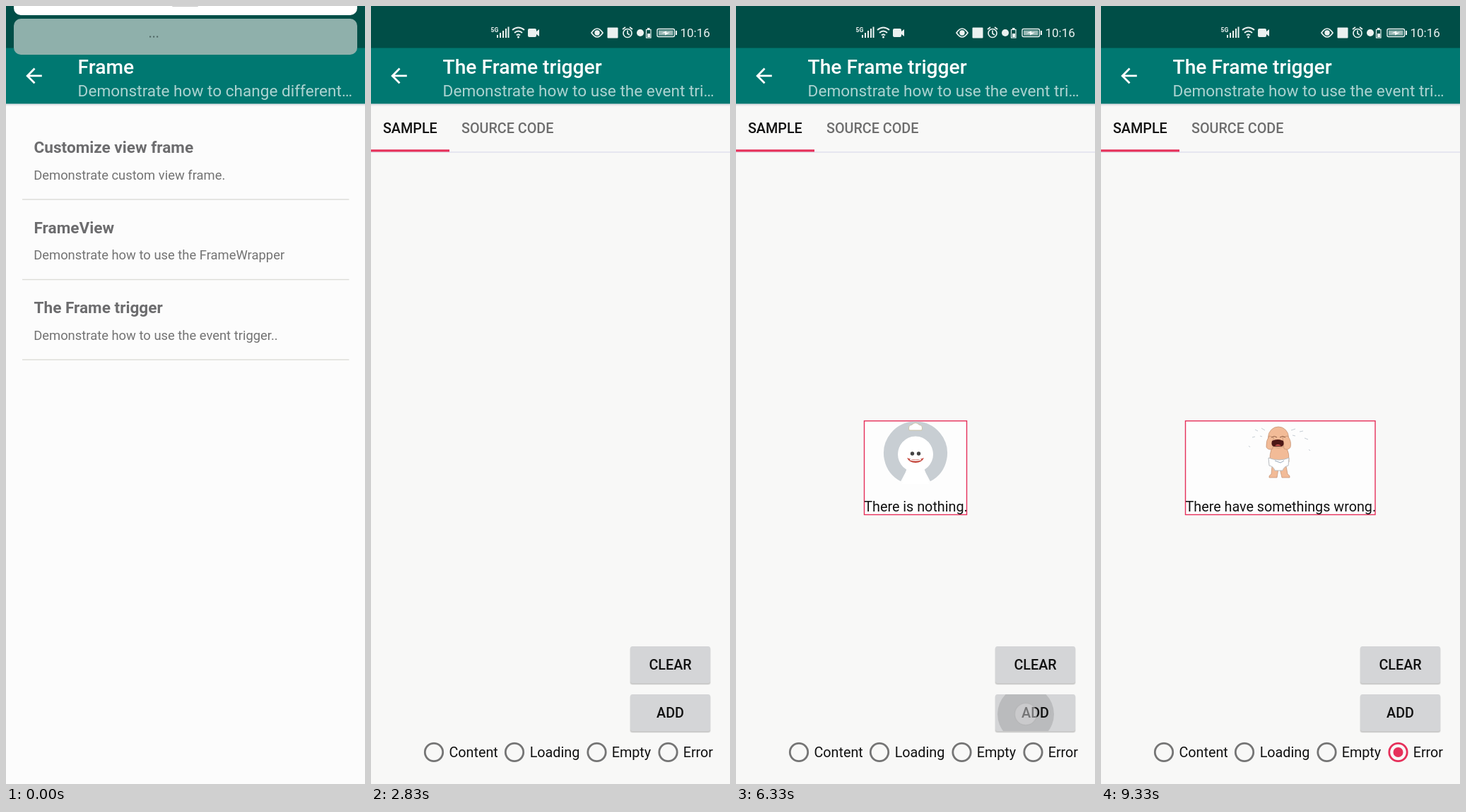
These frames come from a looping animation (508 by 1102 pixels, 9490 ms). An HTML page:

```html
<!DOCTYPE html>
<html lang="en">
<head>
<meta charset="utf-8">
<title>Frame trigger demo</title>
<style>
  html, body { margin: 0; width: 100%; height: 100%; overflow: hidden; background: #fbfbfb; }
  svg { display: block; width: 508px; height: 1102px; font-family: Roboto, Arial, sans-serif; }
  .title { font-size: 28.2px; font-weight: 500; fill: #fff; }
  .subtitle { font-size: 22.6px; fill: #fff; fill-opacity: .68; }
  .row-title { font-size: 22.6px; font-weight: 700; fill: #6c6c6e; }
  .row-note { font-size: 18.4px; fill: #737373; }
  .item { font-size: 22.6px; fill: #212121; }
  .small { font-size: 19.76px; fill: #111; }
  .strong { font-weight: 500; }
  .mid { text-anchor: middle; }
  .line { fill: none; stroke: #fff; }
</style>
</head>
<body>
<svg viewBox="0 0 508 1102">
  <defs>
    <linearGradient id="shadow" x2="0" y2="1">
      <stop stop-color="#446" stop-opacity=".18"/>
      <stop offset="1" stop-color="#446" stop-opacity="0"/>
    </linearGradient>
    <clipPath id="rowClip"><rect x="23" y="388" width="462.500" height="112.500"/></clipPath>
    <clipPath id="listClip"><rect y="208" width="508" height="871"/></clipPath>
    <clipPath id="clearClip"><rect x="367" y="907" width="113" height="52" rx="3"/></clipPath>
    <clipPath id="addClip"><rect x="367" y="975" width="113" height="52" rx="3"/></clipPath>
  </defs>

  <g id="menu">
    <rect y="59" width="508" height="1043" fill="#fcfcfc"/>
    <g id="menuHead"></g>
    <g id="rows"></g>
    <g clip-path="url(#rowClip)"><circle id="rowRipple" fill-opacity=".22"/></g>
  </g>

  <g id="detail">
    <rect y="59" width="508" height="1043" fill="#f8f8f7"/>
    <g id="detailHead"></g>
    <text class="small strong" x="16.900" y="180">SAMPLE</text>
    <text class="small strong" x="128" y="180" fill-opacity=".6">SOURCE CODE</text>
    <rect y="206.300" width="508" height="1.400" fill="#dfdfee"/>
    <rect y="203.300" width="111" height="3.200" fill="#e6305a"/>
    <g id="list" clip-path="url(#listClip)"></g>
    <text id="newItem" class="item" x="45.200" y="272">New Item</text>

    <g id="empty">
      <rect x="181.500" y="587.700" width="145" height="132.800" fill="#fdfdfd" stroke="#e6305a" stroke-width="1.400"/>
      <path d="M238 664A34.500 34.500 0 1 1 270 664" fill="none" stroke="#c8ced3" stroke-width="21"/>
      <path d="M245 601q-2-7 4-8q5-5 10 0q6 1 4 8z" fill="#fff" stroke="#c9c3a8"/>
      <circle cx="254" cy="635" r="25" fill="#fff"/>
      <path d="M242 654h24l7 23h-38z" fill="#fff"/>
      <circle cx="249.500" cy="634" r="2.700" fill="#444"/>
      <circle cx="258.500" cy="634" r="2.700" fill="#444"/>
      <path d="M242 640q12 5 24 0q-3 7-12 7t-12-7z" fill="#c5493f"/>
      <path d="M246 642.500q8 2.500 16 0" fill="none" stroke="#fff" stroke-width="1.500"/>
      <text class="small" x="181.300" y="716">There is nothing.</text>
    </g>

    <g id="error">
      <rect x="119.500" y="587.700" width="268.500" height="132.800" fill="#fdfdfd" stroke="#e6305a" stroke-width="1.400"/>
      <path d="M218 600l4 2M227 598l5 3M214 611l4-1M209 623l2 2M225 609l3 1M269 601l6-2M281 603l5-1M271 608l4 1M288 612l5 2M294 628l2 2" stroke="#c6cdd4"/>
      <g fill="#f2bb97" stroke="#c08f70" stroke-width=".7">
        <path d="M242 652l-1 11q-4 2-3 5h11l2-13zM262 652l2 11q4 2 3 5h-11l-3-13z"/>
        <path d="M242 624q-4 12-3 22h27q1-12-4-22z"/>
        <ellipse cx="251" cy="611" rx="14.500" ry="15"/>
        <path d="M238 609q-5 7-4 16q3 5 9 2l1-16zM264 609q6 7 4 16q-3 5-9 2l-2-16z"/>
      </g>
      <path d="M241 611q5-3 8 0M253 611q4-3 8 0" fill="none" stroke="#8e5c43"/>
      <path d="M242 616q8-4 16 0q2 7-3 8h-10q-5-1-3-8z" fill="#4c1715"/>
      <path d="M246 623q4-4 9 0z" fill="#d45b55"/>
      <path d="M237 640q15 6 29 0l-1 11q-6 1-8 7h-11q-2-6-8-7z" fill="#fff" stroke="#b8bcc0"/>
      <path d="M246 644l8 3 5-3" fill="none" stroke="#9ab"/>
      <text class="small" x="119.500" y="716">There have somethings wrong.</text>
    </g>

    <g id="buttons"></g>
    <g id="radios"></g>
  </g>

  <rect width="508" height="59.500" fill="#004e47"/>
  <g id="status" fill="#fff" fill-opacity=".92" stroke-opacity=".92">
    <text x="169.500" y="37" font-size="8.500" font-weight="700">5G</text>
    <path d="M178 41h2v4h-2zM182 38h2v7h-2zM186 35h2v10h-2zM190 32h2v13h-2zM193.500 29.500h2v15.500h-2z"/>
    <path class="line" stroke-width="2" d="M200 34q8.500-7 17 0M203 38q5.500-5 11 0M206 41.500q2.500-2.500 5 0"/>
    <circle cx="208.500" cy="44" r="1.500"/>
    <path d="M224 32h8q2 0 2 2v2l4-3v10l-4-3v2q0 2-2 2h-8q-2 0-2-2v-8q0-2 2-2z"/>
    <path class="line" stroke-width="1.700" d="M312 38q8-12 16 0q-8 12-16 0z"/>
    <circle cx="320" cy="38" r="3.700"/>
    <rect x="334.500" y="30.500" width="15" height="15" rx="1"/>
    <g class="line" stroke-width="1.700">
      <circle cx="363" cy="38.500" r="6"/>
      <path d="M363 34.500v4.500l3 2M356 33l4-3M370 33l-4-3"/>
      <rect x="389.500" y="33.500" width="6.500" height="11.500" stroke-width="1.200"/>
      <rect x="405" y="32.500" width="24.500" height="11" rx="2" stroke-width="1.400"/>
    </g>
    <circle cx="381" cy="38" r="5"/>
    <path d="M391 39h4v5h-4zM391 31h3.500v2h-3.500zM431 35h2v6h-2z"/>
    <rect x="407" y="34.500" width="20.500" height="7" fill-opacity=".6"/>
    <path d="M411 38.500l7-3v2h5l-7 4v-3z"/>
    <text x="437.500" y="44" font-size="17">10:16</text>
  </g>

  <g id="shade">
    <rect x="11" y="-20" width="486" height="33" rx="10" fill="#fff"/>
    <rect x="235" y="-2" width="37" height="2.800" rx="1" fill="#bbb"/>
    <rect x="11" y="18" width="486" height="51" rx="10" fill="#8fb0ab"/>
    <path d="M203 43.500h2.200M208 43.500h2.200M213 43.500h2.200" stroke="#4f6663" stroke-width="2"/>
  </g>
  <circle id="touch" r="15.500" fill="#d9d9dc" fill-opacity=".5" stroke="#aaa" stroke-opacity=".35" stroke-width="1.500"/>
</svg>

<script>
const LOOP = 9490, FADE = 415;
const $ = id => document.getElementById(id);
const set = (id, attrs) => { for (const k in attrs) $(id).setAttribute(k, attrs[k]); };
const clamp = v => Math.max(0, Math.min(1, v));

const header = (title, note) => `
  <rect y="59" width="508" height="79.500" fill="#007871"/>
  <rect y="138.500" width="508" height="4" fill="url(#shadow)"/>
  <path class="line" stroke-width="2.800" d="M50.800 98.900H31M40.500 88.600L30.200 98.900L40.500 109.200"/>
  <text class="title" x="101.600" y="95.500">${title}</text>
  <text class="subtitle" x="101.600" y="127.500">${note}</text>`;

$('menuHead').innerHTML = header('Frame', 'Demonstrate how to change different…');
$('detailHead').innerHTML = header('The Frame trigger', 'Demonstrate how to use the event tri…');

$('rows').innerHTML = [
  ['Customize view frame', 'Demonstrate custom view frame.'],
  ['FrameView', 'Demonstrate how to use the FrameWrapper'],
  ['The Frame trigger', 'Demonstrate how to use the event trigger..']
].map(([name, note], i) => `<g transform="translate(0 ${i * 113.5})">
  <text class="row-title" x="39.500" y="208">${name}</text>
  <text class="row-note" x="39.200" y="245.500">${note}</text>
  <rect x="23" y="273.300" width="462.500" height="1.400" fill="#dcdcd8"/></g>`).join('');

$('list').innerHTML = [
  'Auberge de Marvol', 'Auberge du Val des Orins', 'Alvoren', 'Ambrelune', 'Amouvi',
  'Anven', 'Arvolsk', 'Aurivelle au Morvent', "Amarga'l Tozu", 'Aruik', 'Ashendel',
  'Arly Brunois', 'Altbruner Rundentaler'
].map((name, i) => `<text class="item" x="45.200" y="${272 + i * 67.82}">${name}</text>`).join('');

$('buttons').innerHTML = [['clear', 907], ['add', 975]].map(([id, y]) => `
  <rect x="366" y="${y + 1}" width="115" height="53.500" rx="4" fill-opacity=".07"/>
  <rect x="367" y="${y + 1}" width="113" height="53" rx="3" fill-opacity=".12"/>
  <rect x="367" y="${y}" width="113" height="52" rx="3" fill="#d4d5d7"/>
  <g clip-path="url(#${id}Clip)"><circle id="${id}Ripple" cx="410" cy="${y + 28}" fill-opacity=".12"/></g>
  <text class="small strong mid" x="423.500" y="${y + 33}">${id.toUpperCase()}</text>`).join('');

$('radios').innerHTML = [
  ['Content', 89, 110.5], ['Loading', 203, 224.7], ['Empty', 319.5, 340.7], ['Error', 420.5, 441.7]
].map(([name, cx, x]) => `
  <circle id="ring${name}" cx="${cx}" cy="1057" fill="none"/>
  <circle id="dot${name}" cx="${cx}" cy="1057" r="7" fill="#e6305a"/>
  <text class="small" x="${x}" y="1064">${name}</text>`).join('');

const CLEAR = [410, 935], ADD = [410, 1003];
// start, end, position of each press
const presses = [
  [670, 1000, [143, 455]], [2500, 2670, CLEAR], [3670, 3830, ADD], [4500, 4670, CLEAR],
  [6330, 6500, ADD], [7330, 7500, [327, 1058]], [8170, 8330, [427, 1058]]
];

function tick(ms) {
  const start = n => Math.round(n * 50 / 3) * 10;
  let n = Math.floor((ms + 5) * 6 / 1000);
  if (start(n) > ms) n--;
  return start(n);
}

function draw(ms) {
  const t = tick(ms);
  const within = (a, b) => t >= a && t < b;
  const fade = from => clamp((t - from) / FADE);
  const alpha = (id, v) => set(id, { opacity: v });
  // each span: fade in, fade out, or a hard cut when `cut` is set
  const spans = (id, list) => alpha(id, Math.max(...list.map(([a, b, cut]) =>
    cut ? (t < b ? fade(a) : 0) : Math.min(fade(a), 1 - fade(b)))));

  set('shade', { transform: `translate(0 ${t < 170 ? 0 : -90})` });
  alpha('status', t < 170 ? 0 : 1);

  // page change: decelerating slide with parallax below
  const left = Math.pow(1 - clamp((t - 883) / 300), 2);
  set('detail', { transform: `translate(${508 * left} 0)` });
  set('menu', { transform: `translate(${-127 * (1 - left)} 0)` });

  const grow = clamp((t - 600) / 230);
  set('rowRipple', {
    cx: 143 + 107 * grow, cy: 455 - 11 * grow, r: 228 * grow + (t > 900 ? 40 : 0),
    opacity: within(670, 1170) ? 1 : 0
  });

  alpha('list', t < 2670 ? 1 : 0);
  spans('newItem', [[3750, 4670, true], [6420, 7370]]);
  spans('empty', [[2885, 3750], [4715, 6420], [7370, 8370]]);
  spans('error', [[8370, LOOP, true]]);

  const press = (id, starts) => {
    const s = starts.find(s => within(s, s + 330));
    set(id, { r: s ? 40 + (t - s) * .4 : 0 });
  };
  press('clearRipple', [2500, 4500]);
  press('addRipple', [3670, 6330]);

  const radio = (name, on, off) => {
    const active = within(on, off), fresh = active && t < on + 160;
    set('ring' + name, {
      r: fresh ? 11 : 12.7, 'stroke-width': fresh ? 6 : 2.8,
      stroke: active ? '#e6305a' : '#757575'
    });
    alpha('dot' + name, active && !fresh ? 1 : 0);
  };
  radio('Content', LOOP, LOOP);
  radio('Loading', LOOP, LOOP);
  radio('Empty', 7330, 8170);
  radio('Error', 8170, LOOP);

  const hit = presses.find(([a, b]) => within(a, b));
  alpha('touch', hit ? 1 : 0);
  if (hit) set('touch', { cx: hit[2][0], cy: hit[2][1] });
}

const began = performance.now();
function loop() {
  draw((performance.now() - began) % LOOP);
  requestAnimationFrame(loop);
}
loop();
</script>
</body>
</html>
```
